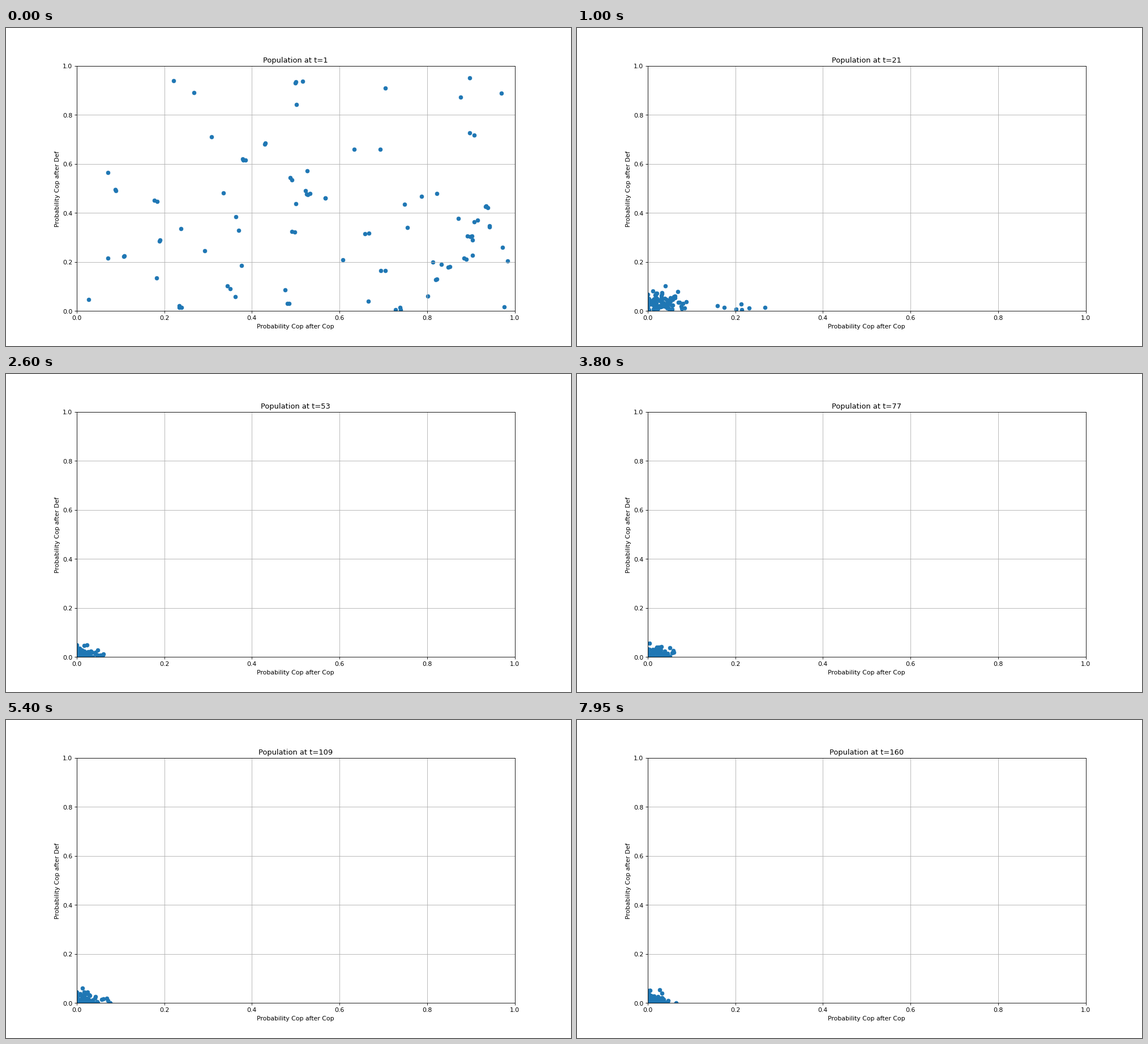
Animation, 998 px wide and 561 px high, one loop 8000 ms. Source, as a matplotlib script:

```python
import numpy as np
import matplotlib.pyplot as plt
from matplotlib.animation import FuncAnimation

FIGSIZE, DPI = (12.8, 7.198), 78    # 998 x 561 pixels
STEPS, INTERVAL = 160, 50
FOUNDERS, LITTERMATES = 64, 29
COST = np.array([3.0, 9.0])         # selection against each probability
SPREAD = np.array([0.007, 0.0065])  # mutation size per generation

# The two thrifty families that outlive all others.
THRIFTY = [(0.028, 0.046), (0.234, 0.022), (0.234, 0.015), (0.239, 0.015)]


def mutate(parents, rng):
    return np.clip(parents + rng.normal(0, SPREAD, parents.shape), 0, 1)


def first_generation(rng):
    """Scattered founders, denser towards the bottom, some with a littermate."""
    pool = rng.random((4 * FOUNDERS, 2)) ** [1, 1.6]
    pool = pool[pool @ COST > 1.3][:FOUNDERS]
    litter = mutate(rng.choice(pool, LITTERMATES), rng)
    return np.vstack([THRIFTY, pool, litter])


def next_generation(pop, rng):
    """Pick parents in proportion to fitness, then mutate the children."""
    cost = pop @ COST
    fitness = np.exp(-cost / (1 + cost.mean()))
    share = np.cumsum(fitness) / fitness.sum()
    picks = (np.arange(len(pop)) + rng.random()) / len(pop)
    parents = np.minimum(np.searchsorted(share, picks), len(pop) - 1)
    return mutate(pop[parents], rng)


def evolve():
    rng = np.random.default_rng(4)
    history = [first_generation(rng)]
    while len(history) < STEPS:
        history.append(next_generation(history[-1], rng))
    return history


history = evolve()

fig, ax = plt.subplots(figsize=FIGSIZE, dpi=DPI)
dots = ax.scatter(*history[0].T)
ax.set(xlim=(0, 1), ylim=(0, 1),
       xlabel="Probability Cop after Cop", ylabel="Probability Cop after Def")
ax.grid(True)
title = ax.set_title("Population at t=1")


def update(i):
    dots.set_offsets(history[i])
    title.set_text(f"Population at t={i + 1}")
    return dots, title


anim = FuncAnimation(fig, update, frames=STEPS, interval=INTERVAL, repeat=True)
plt.show()
```
